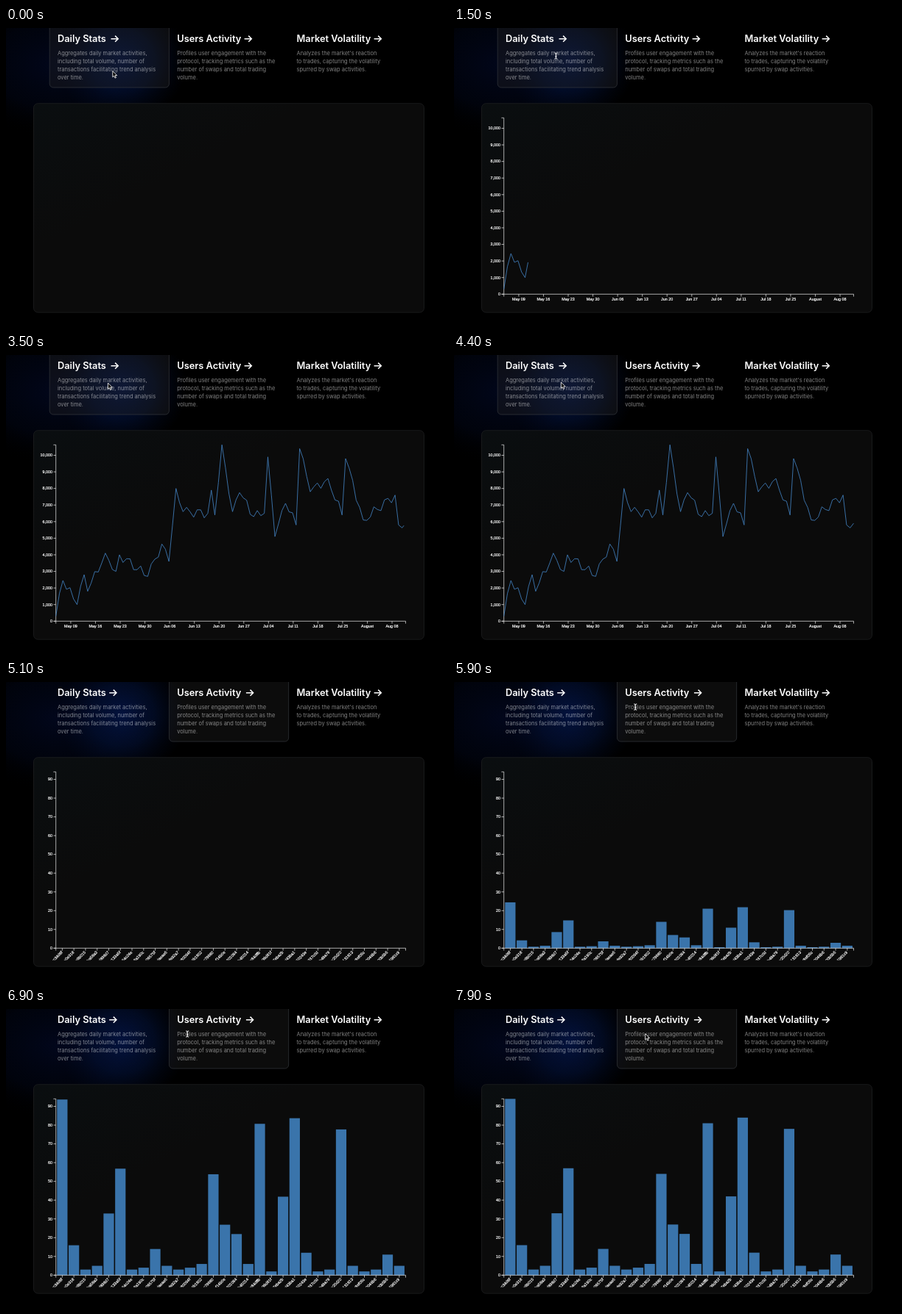
An HTML page for the animation above (8 s loop, 600 px wide and 407 px high).

```html
<!DOCTYPE html>
<html lang="en">
<head>
<meta charset="utf-8">
<title>Market charts</title>
<style>
  html, body { margin: 0; width: 100%; height: 100%; overflow: hidden; background: #000; }
  svg { display: block; width: 100vw; height: 100vh; }
  .title { font: 600 12.8px Inter, sans-serif; fill: #fff; }
  .desc { font: 400 7.48px Inter, sans-serif; fill: #fff; fill-opacity: .5; }
  .axis text { font: 5.4px "Liberation Sans", Arial, sans-serif; fill: #fff; stroke: #fff; stroke-width: .2; }
  .axis path { fill: none; stroke: #fff; stroke-width: .65; }
  .arrow { fill: none; stroke: #fff; stroke-width: 1.5; }
</style>
</head>
<body>
<svg viewBox="0 0 600 407">
  <defs>
    <radialGradient id="navy">
      <stop offset="0" stop-color="#020822" stop-opacity=".8"/>
      <stop offset=".6" stop-color="#010618" stop-opacity=".5"/>
      <stop offset="1" stop-color="#000" stop-opacity="0"/>
    </radialGradient>
    <radialGradient id="blue">
      <stop offset="0" stop-color="#04164a" stop-opacity=".8"/>
      <stop offset=".5" stop-color="#03123a" stop-opacity=".55"/>
      <stop offset="1" stop-color="#020a24" stop-opacity="0"/>
    </radialGradient>
    <linearGradient id="panel" x2=".35" y2=".35">
      <stop offset="0" stop-color="#0a0e10"/>
      <stop offset="1" stop-color="#0b0b0b"/>
    </linearGradient>
    <clipPath id="chartClip"><rect x="38" y="103" width="529" height="275.5"/></clipPath>
  </defs>
  <rect width="600" height="407" fill="#000"/>
  <ellipse cx="70" cy="50" rx="150" ry="100" fill="url(#navy)"/>
  <ellipse cx="158" cy="45" rx="88" ry="85" fill="url(#blue)"/>
  <g id="cards"></g>
  <rect x="37.5" y="102.7" width="530" height="284.5" rx="6" fill="url(#panel)" stroke="#1e1f20" stroke-width=".8"/>
  <g clip-path="url(#chartClip)">
    <g id="lineChart"></g>
    <g id="barChart"></g>
  </g>
  <g id="cursor">
    <path id="pointer" d="M0 0V8.3L1.9 6.6L3.2 9.6L4.6 9L3.3 6.1H5.9Z" fill="#000" stroke="#fff" stroke-width=".85" stroke-linejoin="round"/>
    <path id="beam" d="M-2 -4.1Q0 -4.1 0 -2.9Q0 -4.1 2 -4.1M0 -2.9V2.9M-2 4.1Q0 4.1 0 2.9Q0 4.1 2 4.1M-1.2 .9H1.2" fill="none" stroke="#fff"/>
  </g>
</svg>
<script>
const LOOP = 8000;
const LEFT = 67.7, RIGHT = 542.5, TOP = 122.3, BASE = 362.3, TICK = 3.3;
const LINE = { start: 745, time: 3000, clear: 4700 };
const BARS = { start: 5097, time: 2000 };
const SWAP = 4500;

const $ = id => document.getElementById(id);
const clamp = v => Math.max(0, Math.min(1, v));
const cubic = t => t < .5 ? 4 * t ** 3 : 1 - (2 - 2 * t) ** 3 / 2;
const mix = (a, b, k) => a + (b - a) * k;
const range = (n, make) => Array.from({ length: n }, (_, i) => make(i));
const show = (node, on) => node.setAttribute("display", on ? "inline" : "none");

function add(parent, tag, attrs, text) {
  const node = document.createElementNS("http://www.w3.org/2000/svg", tag);
  for (const key in attrs) node.setAttribute(key, attrs[key]);
  if (text) node.textContent = text;
  parent.appendChild(node);
  return node;
}

// Cards
const cards = [
  { arrow: 140.2, title: "Daily Stats", lines: [
    "Aggregates daily market activities,", "including total volume, number of",
    "transactions facilitating trend analysis", "over time."] },
  { arrow: 323.6, title: "Users Activity", lines: [
    "Profiles user engagement with the", "protocol, tracking metrics such as the",
    "number of swaps and total trading", "volume."] },
  { arrow: 499.6, title: "Market Volatility", lines: [
    "Analyzes the market's reaction", "to trades, capturing the volatility",
    "spurred by swap activities."] }
];
cards.forEach((card, i) => {
  const g = $("cards"), x = 59.2 + i * 162.25;
  card.box = add(g, "rect", { x, y: -20, width: 162.2, height: 101, rx: 5,
    fill: "#262626", "fill-opacity": .33, stroke: "#36393d", "stroke-width": .7 });
  add(g, "text", { class: "title", x: x + 10.8, y: 19 }, card.title);
  card.icon = add(g, "path", { class: "arrow", d: "M0 14.7H9.6M5.6 10.6L9.7 14.7L5.6 18.8" });
  card.lines.forEach((line, row) =>
    add(g, "text", { class: "desc", x: x + 10.8, y: 37.3 + row * 10.8 }, line));
});

// Axes
function addAxes(chart, yStep, yLabels, xTicks) {
  const g = add(chart, "g", { class: "axis" });
  let d = `M${LEFT - TICK} ${TOP}H${LEFT}V${BASE}H${LEFT - TICK}` +
          `M${LEFT} ${BASE + TICK}V${BASE}H${RIGHT}V${BASE + TICK}`;
  yLabels.forEach((label, i) => {
    const y = BASE - i * yStep;
    d += `M${LEFT - TICK} ${y}H${LEFT}`;
    add(g, "text", { x: LEFT - 4.8, y: y + 1.8, "text-anchor": "end" }, label);
  });
  for (const { x, label, slant } of xTicks) {
    d += `M${x} ${BASE}V${BASE + TICK}`;
    add(g, "text", slant
      ? { "text-anchor": "end", transform: `translate(${x + .8} ${BASE + 6.2}) rotate(-45)` }
      : { "text-anchor": "middle", x, y: BASE + 8.7 }, label);
  }
  add(g, "path", { d });
}

// Line chart: turning points as "day:thousands", with a small wiggle on the days between
const DAYS = 100, THOUSAND = 22.58;
const turns = ("0:.3 2:2.45 6:1 8:2.8 9:1.8 14:4.1 17:3 18:4 26:2.7 30:4.65 32:3.6 34:8 36:6.6 " +
  "43:6.5 44:7.9 45:6.4 47:10.63 50:6.6 52:7.75 56:6.3 59:6.5 60:9.9 62:5.1 65:7.1 68:5.8 " +
  "69:10.4 72:7.8 77:8.6 81:6.4 82:9.8 87:6.1 96:7.6 97:5.8 99:5.9")
  .split(" ").map(pair => pair.split(":").map(Number));

function volume(day) {
  const next = turns.findIndex(turn => turn[0] >= day);
  const [d1, v1] = turns[next];
  if (d1 === day) return v1;
  const [d0, v0] = turns[next - 1];
  return mix(v0, v1, (day - d0) / (d1 - d0)) + .3 * Math.sin(day * 1.9);
}

function weekLabel(i) {
  const date = new Date(Date.UTC(2021, 4, 9 + 7 * i));
  const part = options => date.toLocaleString("en-US", { timeZone: "UTC", ...options });
  return date.getUTCDate() === 1 ? part({ month: "long" }) : part({ month: "short", day: "2-digit" });
}

const point = i =>
  `${LEFT + (RIGHT - LEFT) * i / (DAYS - 1)} ${BASE - volume(i) * THOUSAND}`;
addAxes($("lineChart"), THOUSAND,
  range(11, i => (i * 1000).toLocaleString("en-US")),
  range(14, i => ({ label: weekLabel(i), x: 87.9 + i * 33.55 })));
const line = add($("lineChart"), "path", {
  d: "M" + range(DAYS, point).join("L"), fill: "none", stroke: "#4280bf", "stroke-width": .85
});
const lineLength = line.getTotalLength();
line.setAttribute("stroke-dasharray", `${lineLength} ${lineLength + 10}`);

// Bar chart: a few busy wallets, the rest swap rarely
const UNIT = 2.553;
const wallets = ("c34d8f a0e318 e9b015 ba58a3 d898d7 133a5f 64c24e 8a190c 06575f daeae5 " +
  "fe92a7 80064f 6b1902 c79680 f14b0e 301084 b45014 84dffb 36d81f 7eba2b " +
  "d43ba1 50243e 937c0d b48a79 20d20 131813 8ef06c 0046b6 00b5b5 5981c9").split(" ");
const busy = { 0: 94, 1: 16, 4: 33, 5: 57, 8: 14, 13: 54, 14: 27, 15: 22,
  17: 81, 19: 42, 20: 84, 21: 12, 24: 78, 28: 11 };
const swaps = wallets.map((_, i) => busy[i] || Math.round(4.8 + 1.8 * Math.cos(i * 1.55) - i * .04));
const step = (RIGHT - LEFT) / (wallets.length + .1);
const barX = i => LEFT + step * (i + .1);
const bars = swaps.map((_, i) =>
  add($("barChart"), "rect", { x: barX(i), width: step * .9, fill: "#3a74ab" }));
addAxes($("barChart"), UNIT * 10, range(10, i => String(i * 10)),
  wallets.map((id, i) => ({ label: "0x" + id, x: barX(i) + step * .45, slant: true })));

// Cursor moves, each easing on from the previous place
const rest = { x: 144.8, y: 58.5 };
const moves = [
  { from: 100, to: 300, x: 141, y: 24 },
  { from: 800, to: 1200, x: 138.4, y: 38 },
  { from: 4300, to: 4700, x: 246, y: 22 },
  { from: 5200, to: 5500, x: 246.2, y: 34 },
  { from: 7600, to: 7900, x: 259.6, y: 33.5 }
];

function cursorAt(t) {
  let { x, y } = rest;
  for (const move of moves) {
    const k = cubic(clamp((t - move.from) / (move.to - move.from)));
    x = mix(x, move.x, k);
    y = mix(y, move.y, k);
  }
  return [x, y];
}

function draw(t) {
  const swap = clamp((t - SWAP) / 150);
  const hover = [1 - swap, swap, 0];
  cards.forEach((card, i) => {
    card.box.setAttribute("opacity", hover[i]);
    card.icon.setAttribute("transform", `translate(${card.arrow + 2.3 * hover[i]} 0)`);
  });

  const drawn = cubic(clamp((t - LINE.start) / LINE.time));
  show($("lineChart"), t >= LINE.start && t < LINE.clear);
  show(line, drawn > 0);
  line.setAttribute("stroke-dashoffset", lineLength * (1 - drawn));

  const grown = cubic(clamp((t - BARS.start) / BARS.time));
  show($("barChart"), t >= BARS.start);
  bars.forEach((bar, i) => {
    const h = swaps[i] * UNIT * grown;
    bar.setAttribute("y", BASE - h);
    bar.setAttribute("height", h);
  });

  const beam = (t >= 900 && t < 3400) || (t >= 5300 && t < 7650);
  show($("cursor"), t < 5000 || t >= 5200);
  show($("beam"), beam);
  show($("pointer"), !beam);
  $("cursor").setAttribute("transform", `translate(${cursorAt(t)})`);
}

const begin = performance.now();
function tick() {
  draw((performance.now() - begin) % LOOP);
  requestAnimationFrame(tick);
}
tick();
</script>
</body>
</html>
```
